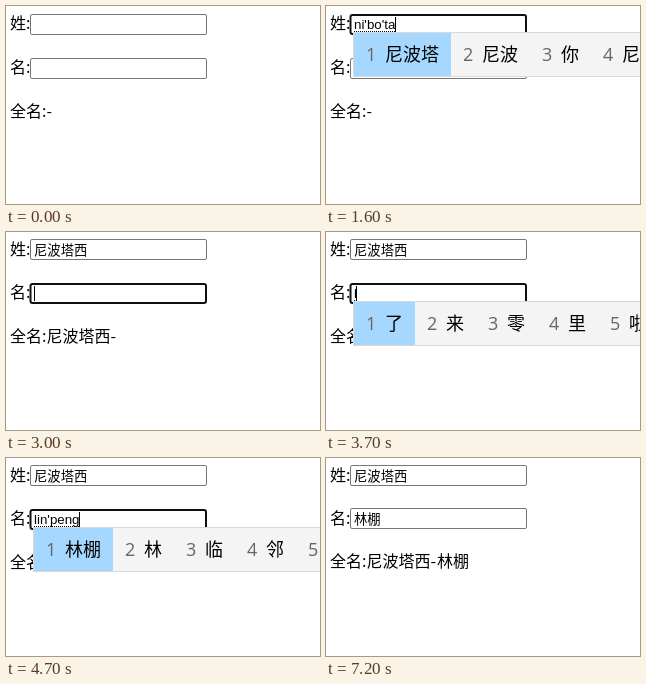
Animation of 314x198 px, one loop 7.3 s. Source, as an HTML page:

```html
<!DOCTYPE html>
<html lang="zh-CN">
<head>
<meta charset="utf-8">
<title>姓名</title>
<style>
  html, body { margin: 0; width: 100%; height: 100%; overflow: hidden; background: #fff; }
  svg { display: block; position: absolute; left: 0; top: 0; }
  text { font: 16px "Noto Sans CJK SC", "Noto Sans CJK", sans-serif; white-space: pre; }
  .value { font: 13.333px "Liberation Sans", "Noto Sans CJK SC", "Noto Sans CJK", sans-serif; }
  .box { fill: #fff; stroke: #767676; }
  .box.hover { stroke: #404040; }
  .ring { fill: #fff; stroke: #101010; stroke-width: 2; }
  .under { stroke: #000; stroke-dasharray: 1 1; }
  .panel { fill: #f4f4f4; stroke: #d9d9d9; }
  .pick { fill: #a6d8ff; }
  #panel text { font-size: 18px; }
  #panel .num { font-family: "Open Sans", "Noto Sans", sans-serif; fill: #666; }
</style>
</head>
<body>
<svg width="314" height="198" viewBox="0 0 314 198">
  <text x="4" y="23">姓:</text>
  <text id="label2" x="4">名:</text>
  <text id="full" x="4"><tspan></tspan><tspan dx="1"></tspan></text>
  <g class="field"></g>
  <g class="field"></g>
  <g id="panel"></g>
</svg>
<script>
const LOOP = 7300;
const FIRST = '尼波塔西', LAST = '林棚';

// Each step overrides part of the state from its time onwards.
const steps = [
  [0, { hover: 0, focus: 0, caret: true, typed: '', words: '', first: '', last: '' }],
  [100, { hover: 1 }],
  [300, { focus: 1 }],
  [800, { caret: false }],
  [900, { caret: true, typed: 'n', words: '你 那 呢 能 年' }],
  [1000, { typed: 'ni', words: '你 尼 拟 妮 泥' }],
  [1300, { typed: "ni'bo", words: '尼波 你 尼 拟 妮' }],
  [1600, { typed: "ni'bo'ta", words: '尼波塔 尼波 你 尼 拟' }],
  [1800, { typed: "ni'bo'ta'x", words: '尼波塔西 尼波 你 尼' }],
  [1900, { typed: "ni'bo'ta'xi", words: '尼波塔西 尼波 你 尼' }],
  [2200, { typed: '', words: '', first: FIRST, hover: 0 }],
  [2600, { hover: 2 }],
  [2700, { caret: false }],
  [2900, { focus: 0 }],
  [3000, { focus: 2, caret: true }],
  [3500, { caret: false }],
  [3700, { caret: true, typed: 'l', words: '了 来 零 里 啦' }],
  [3900, { typed: 'li', words: '里 李 力 离 理' }],
  [4200, { typed: 'lin', words: '林 临 邻 淋 琳' }],
  [4300, { typed: "lin'p", words: '林棚 林 临 邻 淋' }],
  [4400, { typed: "lin'pe", words: '林棚 林 临 邻 淋' }],
  [4500, { typed: "lin'pen", words: '林盆 林 临 邻 淋' }],
  [4700, { typed: "lin'peng", words: '林棚 林 临 邻 淋' }],
  [5100, { typed: '', words: '', last: LAST, hover: 0 }],
  [5600, { caret: false }],
  [6100, { caret: true }],
  [6600, { caret: false }],
  [7100, { caret: true }],
  [7200, { focus: 0 }]
];

const $ = id => document.getElementById(id);
const fields = document.querySelectorAll('.field');
const panel = $('panel'), full = $('full').children;

function add(parent, tag, attrs, text) {
  const el = document.createElementNS('http://www.w3.org/2000/svg', tag);
  for (const key in attrs) el.setAttribute(key, attrs[key]);
  if (text) el.textContent = text;
  return parent.appendChild(el);
}

const rect = (parent, cls, x, y, width, height, rx = 0) =>
  add(parent, 'rect', { class: cls, x, y, width, height, rx });

function drawField(n, top, base, value, s) {
  const g = fields[n - 1], focused = s.focus === n;
  g.replaceChildren();
  if (focused) rect(g, 'ring', 24.5, top + 1, 175.5, 19, 2);
  else rect(g, s.hover === n ? 'box hover' : 'box', 24.5, top + .5, 176, 20, 1.5);

  const typed = focused ? s.typed : '';
  const text = add(g, 'text', { class: 'value', x: 28, y: base }, value + typed);
  if (!focused) return;
  const end = 28 + (value + typed ? Math.floor(text.getComputedTextLength()) : 0);
  if (typed) add(g, 'line', { class: 'under', x1: 28, x2: end, y1: base + 2.5, y2: base + 2.5 });
  if (s.caret) rect(g, 'caret', end, base - 12, 1, 15);
}

function drawPanel(top, words) {
  panel.replaceChildren();
  if (!words) return;
  rect(panel, 'panel', 27.5, top + .5, 400, 44);
  let x = 28;
  words.split(' ').forEach((word, i) => {
    const width = 43 + 18 * word.length;
    if (!i) rect(panel, 'pick', x, top + 1, width, 43);
    add(panel, 'text', { class: 'num', x: x + 12, y: top + 29 }, String(i + 1));
    add(panel, 'text', { x: x + 31, y: top + 29 }, word);
    x += width;
  });
}

function draw(s) {
  // Chinese text makes an input sit one pixel higher in its line.
  const up1 = s.first ? 1 : 0, up2 = up1 + (s.last ? 1 : 0);
  const base2 = 67 - up1;
  $('label2').setAttribute('y', base2);
  $('full').setAttribute('y', 111 - up2);
  full[0].textContent = `全名:${s.first}-`;
  full[1].textContent = s.last;
  drawField(1, 8 - up1, 23, s.first, s);
  drawField(2, 52 - up2, base2, s.last, s);
  drawPanel(s.focus === 2 ? 69 : 26, s.words);
}

let shown = -1;
function frame() {
  const t = performance.now() % LOOP;
  const count = steps.filter(([at]) => at <= t).length;
  if (count !== shown) {
    shown = count;
    draw(Object.assign({}, ...steps.slice(0, count).map(step => step[1])));
  }
  requestAnimationFrame(frame);
}
frame();
</script>
</body>
</html>
```
